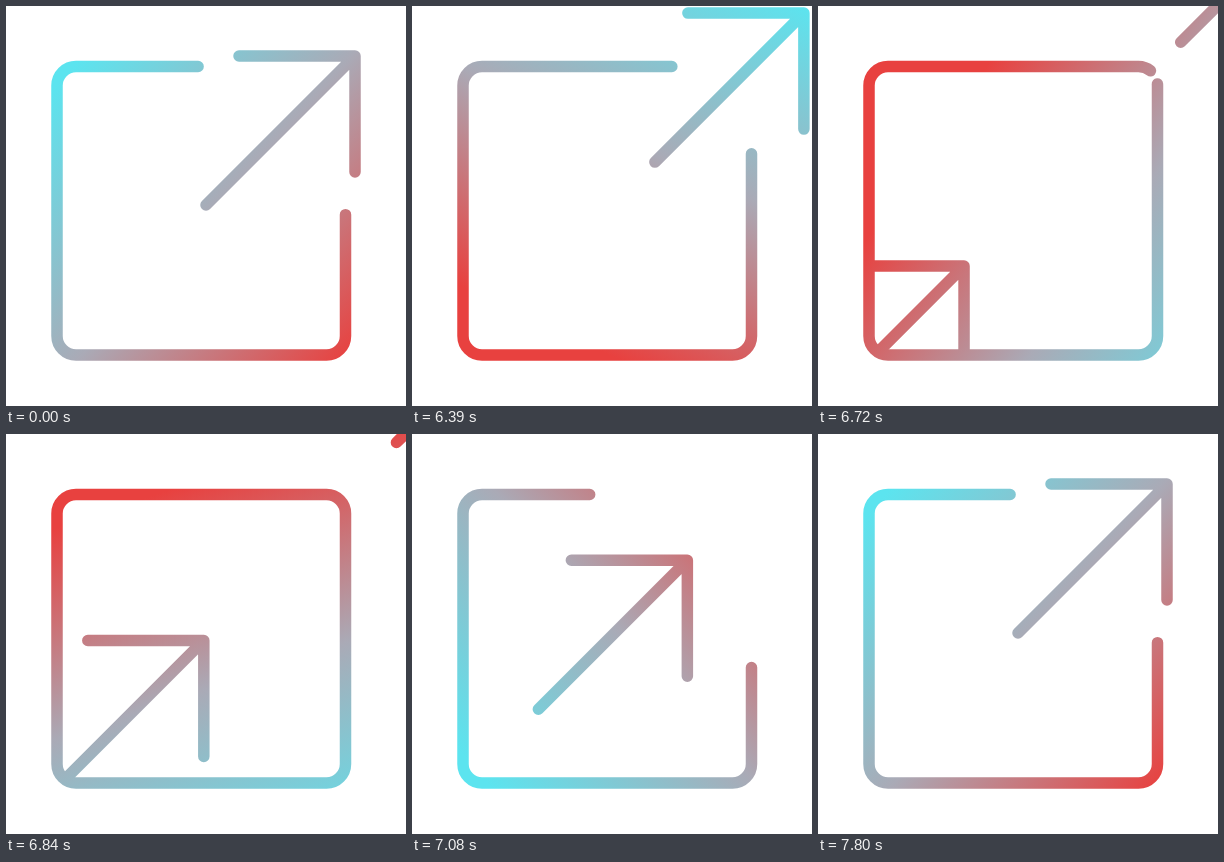
Write an HTML page with a canvas that moves like this. It is 400 by 400 pixels and loops after 7.83 s.

```html
<!DOCTYPE html>
<html lang="en">
<head>
<meta charset="utf-8">
<title>Open link icon</title>
<style>
  html, body { margin: 0; width: 100%; height: 100%; overflow: hidden; background: #fff; }
  canvas { display: block; width: 400px; height: 400px; }
</style>
</head>
<body>
<canvas id="stage" width="400" height="400"></canvas>
<script>
const ctx = document.getElementById('stage').getContext('2d');
const LOOP = 7830, HOLD = 6000, STEP = 30, STEPS = 60;
const BOX = { left: 51, top: 60.5, right: 339.5, bottom: 349, radius: 19 };
const TIP = { x: 349, y: 50 }, SHAFT = 149, ARM = 116;

const progress = (step, from, to) => Math.min(1, Math.max(0, (step - from) / (to - from)));
const bell = (step, from, to) => Math.sin(Math.PI * progress(step, from, to));

// Smooth ease in and out; a power below 1 moves the fast part earlier.
function ease(step, from, to, power = 1) {
  const u = progress(step, from, to) ** power;
  return u * u * (3 - 2 * u);
}

// Arrow offsets along the diagonal, relative to the resting place.
function leaving(step) {
  const windUp = -16 * Math.sin(Math.PI / 2 * progress(step, 0, 6));
  return windUp + 220 * ease(step, 6, 33, 0.8);
}
const arriving = step => -0.0261 * (STEPS - step) ** 2.5;

// Half the length of the opening in the box: closes, reopens too wide, settles.
function halfGap(step) {
  const closing = 1 - ease(step, 0, 28);
  const opening = ease(step, 29, 36);
  return 144 * (closing + opening) + 27 * bell(step, 29, 56);
}

// A linear gradient that turns once and swings out to the cyan side.
function colours(step) {
  const angle = (222 + 360 * ease(step, 0, 56, 0.85)) * Math.PI / 180;
  const shift = 120 * bell(step, 4, 36) ** 2 - 8;
  const at = d => [200 + d * Math.cos(angle), 200 + d * Math.sin(angle)];
  const fill = ctx.createLinearGradient(...at(shift + 200), ...at(shift - 200));
  fill.addColorStop(0, '#5ce4ef');
  fill.addColorStop(0.5, '#aaaab6');
  fill.addColorStop(1, '#e8413f');
  return fill;
}

function drawBox(step) {
  const { left, top, right, bottom, radius: r } = BOX;
  const q = Math.PI / 2;
  const length = 2 * (right - left + bottom - top) - 8 * r + 4 * q * r;
  const gap = 2 * halfGap(step);
  const drift = 5.5 * bell(step, 0, STEPS);
  ctx.save();
  ctx.beginPath();
  // Starts and ends in the middle of the top right corner.
  ctx.arc(right - r, top + r, r, -q / 2, 0);
  ctx.arc(right - r, bottom - r, r, 0, q);
  ctx.arc(left + r, bottom - r, r, q, 2 * q);
  ctx.arc(left + r, top + r, r, 2 * q, 3 * q);
  ctx.arc(right - r, top + r, r, 3 * q, 3.5 * q);
  if (gap > 0) {
    ctx.setLineDash([length - gap, gap]);
    ctx.lineDashOffset = -(gap / 2 + drift);
  }
  ctx.stroke();
  ctx.restore();
}

function drawArrow(head, tail) {
  const rise = d => d < 0 ? d * 1.035 : d;
  const x = TIP.x + head, y = TIP.y - rise(head);
  ctx.beginPath();
  ctx.moveTo(x - ARM, y);
  ctx.lineTo(x, y);
  ctx.lineTo(x, y + ARM);
  ctx.moveTo(x, y);
  ctx.lineTo(TIP.x - SHAFT + tail, TIP.y + SHAFT - rise(tail));
  ctx.stroke();
}

function drawLeavingArrow(step) {
  const d = leaving(step);
  drawArrow(d, d < 0 ? d * 0.55 : d);
}

function drawArrivingArrow(step) {
  const d = arriving(step);
  ctx.save();
  ctx.beginPath();
  // Only the lower left corner of this clip lies on the stage.
  ctx.roundRect(BOX.left, -300, 800, BOX.bottom + 300, BOX.radius);
  ctx.clip();
  drawArrow(d, d);
  ctx.restore();
}

function render(time) {
  const step = Math.max(0, Math.floor((time % LOOP - HOLD) / STEP + 1e-6));
  ctx.fillStyle = '#fff';
  ctx.fillRect(0, 0, 400, 400);
  ctx.strokeStyle = colours(step);
  ctx.lineWidth = 11.5;
  ctx.lineCap = ctx.lineJoin = 'round';
  drawBox(step);
  drawLeavingArrow(step);
  drawArrivingArrow(step);
}

const start = performance.now();
function tick() {
  render(performance.now() - start);
  requestAnimationFrame(tick);
}
tick();
</script>
</body>
</html>
```
